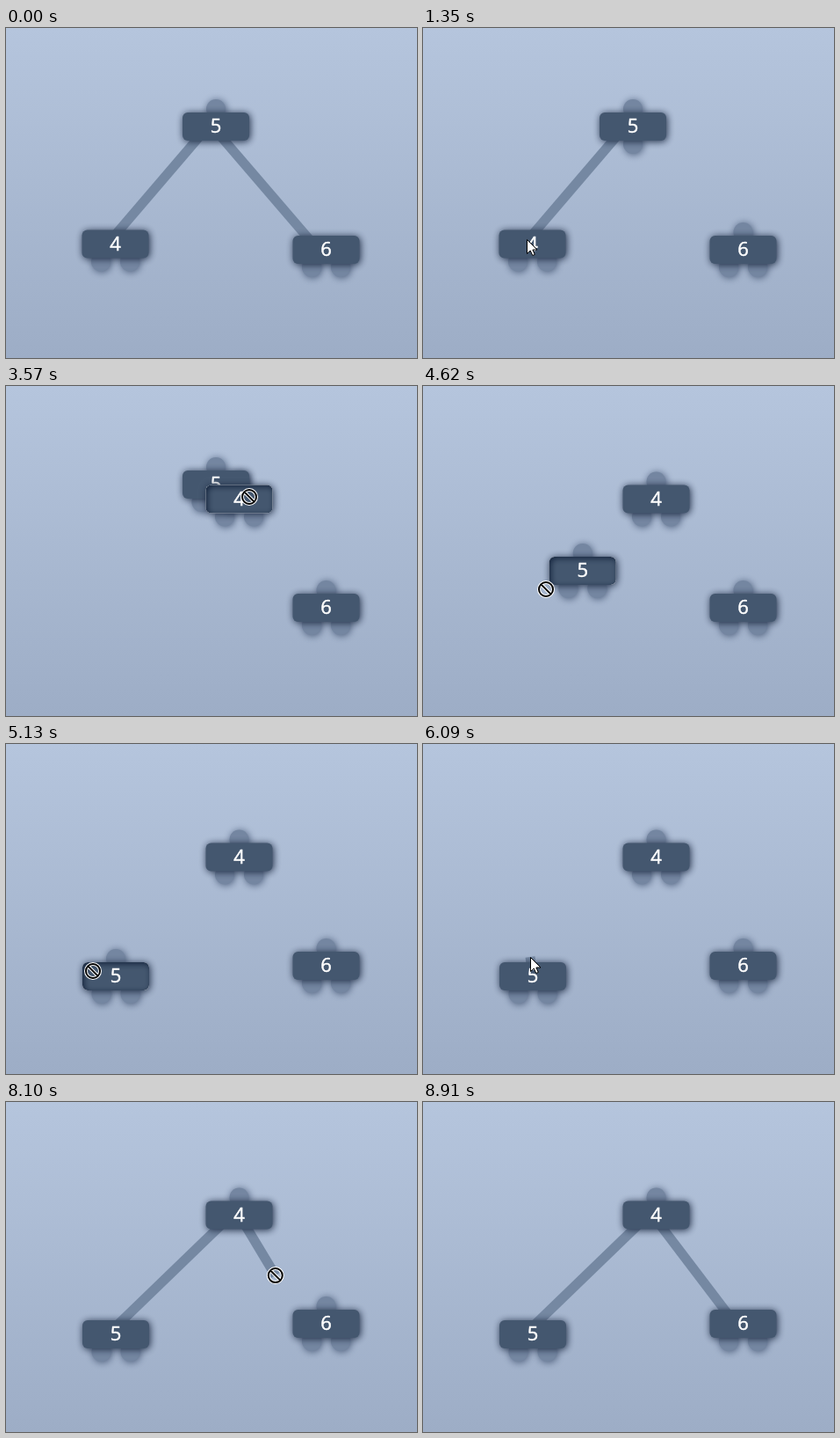
An HTML page with a canvas that plays this animation: 468 by 375 pixels, repeating every 9330 ms.

```html
<!DOCTYPE html>
<html lang="en">
<head>
<meta charset="utf-8">
<title>Tree editing by drag and drop</title>
<style>
  html, body { margin: 0; width: 100%; height: 100%; overflow: hidden; }
  canvas { display: block; }
</style>
</head>
<body>
<canvas id="stage" width="468" height="375"></canvas>
<script>
const ctx = document.getElementById('stage').getContext('2d');
const LOOP = 9330, STEP = 30, LAG = 45;

const move = (from, to, ...points) => ({ from, to, points });

// The pointer travels through each move's points at an even pace and rests in between
const moves = [
  move(480, 1350, [449, 200], [347, 230], [395, 62], [118, 240]),
  move(1680, 2280, [295, 113], [285, 140]),
  move(2490, 3420, [156, 215], [136, 243], [334, 186], [277, 126]),
  move(3690, 4350, [213, 106]),
  move(4470, 4770, [140, 231], [99, 258]),
  move(5430, 6060, [90, 257], [122, 242]),
  move(6240, 6420, [246, 108]),
  move(6690, 7620, [251, 123], [248, 119]),
  move(7650, 8580, [264, 150], [364, 260], [354, 251]),
  move(8790, 8910, [470, 110])
];
moves.forEach((m, i) => { if (i) m.points.unshift(moves[i - 1].points.at(-1)); });

const during = (t, from, to) => t >= from && t < to;
const clamp = (v, lo, hi) => Math.min(hi, Math.max(lo, v));

function pointer(t) {
  const { from, to, points } = moves.findLast(m => t >= m.from) || moves[0];
  const legs = points.length - 1;
  const pos = clamp((t - from) / (to - from), 0, 1) * legs;
  const i = Math.min(Math.floor(pos), legs - 1), u = pos - i;
  const ease = u * u * (3 - 2 * u);
  const [x, y] = [0, 1].map(k => points[i][k] + (points[i + 1][k] - points[i][k]) * ease);
  return { x, y };
}

// A dragged node trails the pointer slightly
function dragged(x, y, t, grab, drop) {
  const a = pointer(grab), b = pointer(clamp(t - LAG, grab, drop));
  return { x: x + b.x - a.x, y: y + b.y - a.y };
}

function shadow(color, blur, dx = 0, dy = dx) {
  ctx.shadowColor = color;
  ctx.shadowBlur = blur;
  ctx.shadowOffsetX = dx;
  ctx.shadowOffsetY = dy;
}

function link(a, b) {
  ctx.strokeStyle = '#7588a2';
  ctx.lineWidth = 11;
  ctx.beginPath();
  ctx.moveTo(a.x, a.y);
  ctx.lineTo(b.x, b.y);
  ctx.stroke();
}

// Attached links sit slightly left of the node centres
function join(parent, child) {
  const dx = child.x < parent.x ? -9 : -4;
  link({ x: parent.x + dx, y: parent.y }, { x: child.x - 9, y: child.y });
}

function knob(x, y) {
  ctx.save();
  shadow('rgba(50,68,98,.8)', 8, 1);
  ctx.fillStyle = '#7486a1';
  ctx.beginPath();
  ctx.arc(x, y, 11, 0, Math.PI * 2);
  ctx.fill();
  ctx.restore();
}

function knobs({ x, y }, top, bottom) {
  if (top) knob(x, y - 20);
  for (let i = 0; i < bottom; i++) knob(x + 33 * (i - (bottom - 1) / 2), y + 20);
}

function node(label, { x, y }, pressed) {
  const box = new Path2D();
  box.roundRect(x - 38, y - 16, 76, 32, 6);
  ctx.save();
  shadow('rgba(20,34,58,.95)', 9, 1);
  ctx.fillStyle = '#44576f';
  ctx.fill(box);
  ctx.restore();
  if (pressed) {
    // Inner shadow cast by a frame just outside the box
    const frame = new Path2D(box);
    frame.rect(x - 60, y - 40, 120, 80);
    ctx.save();
    ctx.clip(box);
    shadow('#14243d', 7, 2);
    ctx.fill(frame, 'evenodd');
    ctx.restore();
  }
  ctx.fillStyle = ctx.strokeStyle = '#fff';
  ctx.lineWidth = .5;
  ctx.font = '22px "Open Sans", "Noto Sans", sans-serif';
  ctx.textAlign = 'center';
  ctx.fillText(label, x, y + 7);
  ctx.strokeText(label, x, y + 7);
}

function arrow({ x, y }) {
  const shape = new Path2D('M.5.5V16.5L4.2 13 6.8 18.5 9.3 17.4 6.9 12H12Z');
  ctx.save();
  ctx.translate(x, y);
  ctx.fillStyle = '#fff';
  ctx.strokeStyle = '#000';
  ctx.lineWidth = 1;
  ctx.fill(shape);
  ctx.stroke(shape);
  ctx.restore();
}

function noDrop({ x, y }) {
  const sign = new Path2D();
  sign.arc(x, y, 8, 0, Math.PI * 2);
  sign.moveTo(x - 5.6, y - 5.6);
  sign.lineTo(x + 5.6, y + 5.6);
  [['#fff', 4], ['#000', 2]].forEach(([color, width]) => {
    ctx.strokeStyle = color;
    ctx.lineWidth = width;
    ctx.stroke(sign);
  });
}

function draw(t) {
  const cursor = pointer(t);
  const four = dragged(124.5, 245.5, t, 2955, 3690);
  const five = dragged(239, 112, t, 4470, 5370);
  const six = { x: 364.5, y: 252 };
  const drag4 = during(t, 2955, 3690), drag5 = during(t, 4470, 5370);
  const pull6 = during(t, 770, 1060), pull4 = during(t, 1680, 1980);
  const to5 = during(t, 6060, 6690), to6 = during(t, 7960, 8400);

  const sky = ctx.createLinearGradient(0, 0, 0, 375);
  sky.addColorStop(0, '#b5c5dd');
  sky.addColorStop(1, '#9dadc6');
  ctx.fillStyle = sky;
  ctx.fillRect(0, 0, 468, 375);

  knobs(four, t >= 1680, 2 - (t >= 6690) - (t >= 7960));
  knobs(five, t < 6060, 2 - (t < 1060) - (t < 1980));
  knobs(six, during(t, 770, 8400), 2);

  if (t < 1680) join(five, four);
  if (t < 770) join(five, six);
  if (t >= 6690) join(four, five);
  if (t >= 8400) join(four, six);
  if (pull6 || pull4 || to5) link(five, cursor);
  if (to6) link(four, cursor);

  const nodes = [['6', six], ['5', five, drag5], ['4', four, drag4]];
  nodes.sort((a, b) => !!a[2] - !!b[2]).forEach(n => node(...n));

  const blocked = drag4 || drag5 || pull6 || pull4 || to6 || to5 && t >= 6240;
  if (during(t, 480, 8910)) (blocked ? noDrop : arrow)(cursor);
}

const start = performance.now();
function tick() {
  const t = (performance.now() - start) % LOOP;
  draw(Math.floor(t / STEP) * STEP);
  requestAnimationFrame(tick);
}
tick();
</script>
</body>
</html>
```
